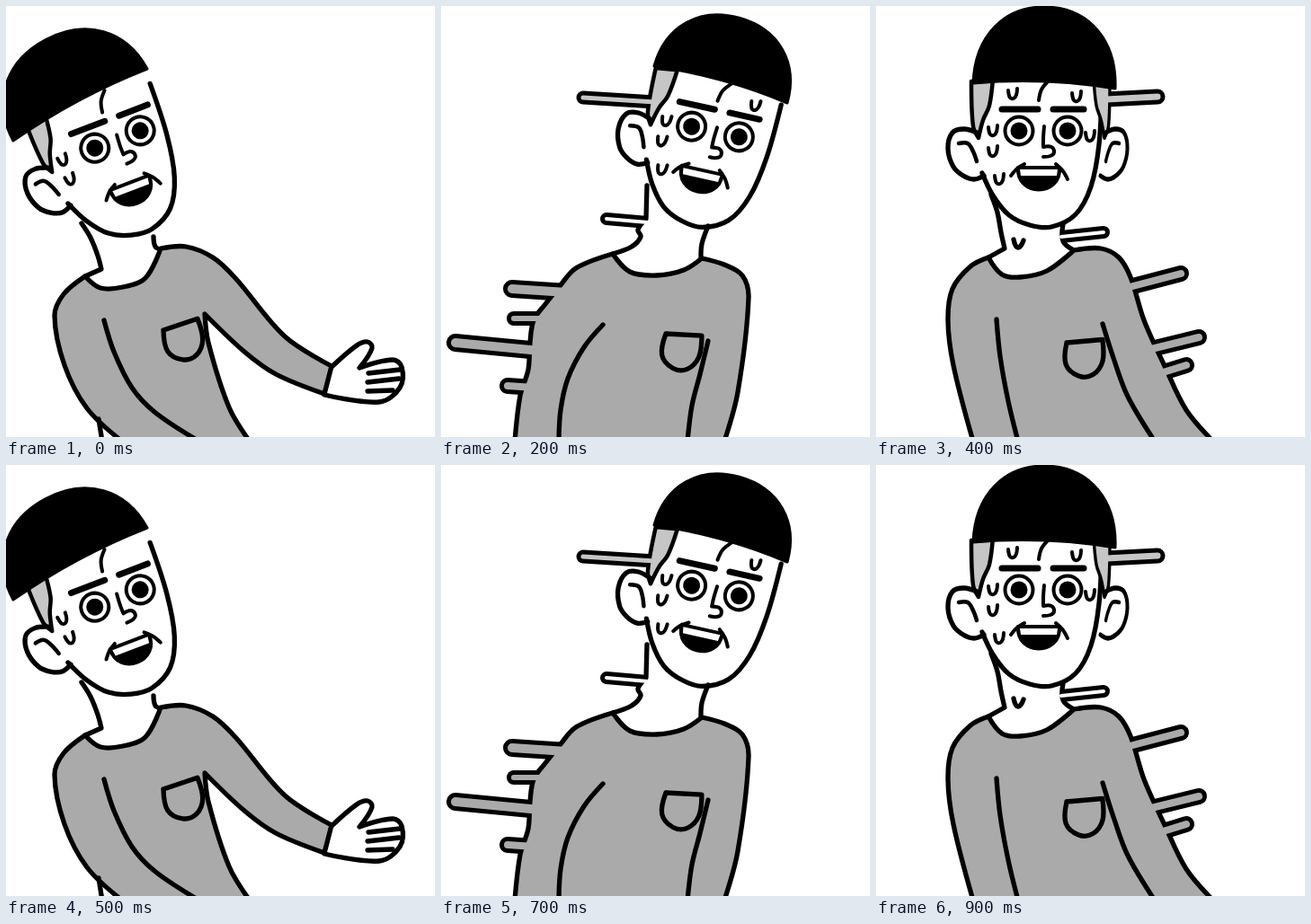
An HTML page with a canvas that plays this animation: 477 by 480 pixels, repeating every 1000 ms.

```html
<!DOCTYPE html>
<html>
<head>
<meta charset="utf-8">
<style>
html, body { margin: 0; height: 100%; overflow: hidden; background: #fff; }
canvas { display: block; }
</style>
</head>
<body>
<canvas id="stage" width="477" height="480"></canvas>
<script>
const ctx = document.getElementById('stage').getContext('2d');
const BLACK = '#000', WHITE = '#fff', SHIRT = '#aaa', LIGHT = '#c6c6c6', STEP = 100;

// head: point between the eyes, tilt in degrees; turn: sideways shift of the skull
// hair: ends of the fringe and height; smears: from, to, thickness, colour
// Strings are smooth curves through "x,y" points; "/" marks a sharp corner.
const left = {
  head: [124, 148.5, -21], turn: -9, mouth: 50, drops: 2,
  hair: [8, 150, 157, 70, 82], pocket: [175, 361], smears: [],
  neck: ['84,242 94,258 102,278 106,293 / 88,301', '172,271 166,268 164,257'],
  shirt: '128,484 90,448 65,400 54,345 64,321 88,301 / 105,314 130,313 155,303 172,270 / 200,268 230,280 255,303 310,368 362,401 / 354,432 / 300,410 265,385 221,343 / 225,375 248,447 271,485',
  lines: ['103,460 107,485', '109,350 120,385 140,425 165,452 210,482',
    '362,402 390,378 402,374 407,381 393,403 / 430,394 440,402 438,425 415,441 354,433',
    '403,409 438,405', '402,419 437,415', '402,429 430,428']
};

const swingRight = {
  head: [305, 140, 12.5], turn: 0, mouth: 45, drops: 4,
  hair: [237, 67, 385, 108, 77], pocket: [250, 365],
  smears: [[238, 107, 158, 102, 10, LIGHT], [230, 241, 184, 237, 9, WHITE],
    [140, 319, 79, 315, 15, SHIRT], [110, 348, 81, 348, 11, SHIRT],
    [110, 384, 16, 375, 15, SHIRT], [104, 425, 74, 423, 13, SHIRT]],
  neck: ['229,200 228,237 / 219,249 222,257 212,268 191,276', '289,281 290,265 297,245'],
  shirt: '82,485 88,434 97,405 99,375 103,350 116,332 132,312 150,292 191,276 / 210,296 240,300 270,294 290,281 / 315,288 335,300 342,325 330,430 315,485',
  lines: ['180,355 159,380 141,415 133,450 131,485', '297,373 288,410 279,445 274,485']
};

const right = {
  head: [381, 158, 19.4], turn: 0, mouth: 41, drops: 6,
  hair: [321, 88, 464, 139, 81], pocket: [300, 394], smears: [],
  neck: ['303,226 298,255 289,282 / 259,283', '342,298 347,283 354,265'],
  shirt: '50,485 105,450 165,360 195,320 230,290 259,282 / 280,309 310,314 344,300 / 370,305 388,324 394,360 365,440 337,485',
  lines: ['222,379 190,415 165,450 134,484', '344,391 325,430 308,455 274,484']
};

const swingLeft = {
  head: [186, 139, 0], turn: 0, mouth: 41, drops: 6, bothSides: true,
  hair: [108, 86, 266, 92, 88], pocket: [212, 375],
  smears: [[256, 104, 313, 101, 12, LIGHT], [206, 257, 253, 252, 9, WHITE],
    [278, 314, 339, 298, 13, SHIRT], [302, 383, 359, 369, 13, SHIRT],
    [316, 409, 345, 400, 13, SHIRT]],
  neck: ['128,210 135,230 139,252 143,270 / 125,280', '220,272 208,262 208,243'],
  shirt: '108,485 86,400 80,350 85,315 105,290 125,280 / 140,299 160,302 190,295 220,272 / 250,270 270,280 283,302 298,350 321,401 345,450 375,485',
  lines: ['134,349 138,390 147,440 158,485', '252,354 265,395 280,435 310,485', '153,260 158,269 164,261']
};

const middle = { ...swingLeft, smears: [] };
const poses = [left, middle, swingRight, right, swingLeft];

const drops = [[-56, 0], [-56, 23], [-49, 54], [37, -38], [-34, -41], [52, 6]];

// Tangent handles follow each segment's length, so tight turns stay round.
function curve(text, fill, width = 5.3) {
  const parts = text.split('/').map(s => s.trim().split(/\s+/).map(p => p.split(',').map(Number)));
  ctx.beginPath();
  ctx.moveTo(...parts[0][0]);
  let last;
  for (const part of parts) {
    const pts = last ? [last, ...part] : part;
    const dir = pts.map((p, i) => {
      const a = pts[i - 1], b = pts[i + 1];
      if (!a || !b) return [0, 0];
      const dx = b[0] - a[0], dy = b[1] - a[1], n = Math.hypot(dx, dy) || 1;
      return [dx / n, dy / n];
    });
    for (let i = 1; i < pts.length; i++) {
      const [ax, ay] = pts[i - 1], [bx, by] = pts[i];
      const h = Math.hypot(bx - ax, by - ay) / 3;
      ctx.bezierCurveTo(ax + dir[i - 1][0] * h, ay + dir[i - 1][1] * h,
        bx - dir[i][0] * h, by - dir[i][1] * h, bx, by);
    }
    last = pts[pts.length - 1];
  }
  paint(fill, width);
}

function paint(fill, width) {
  if (fill) { ctx.fillStyle = fill; ctx.fill(); }
  if (width) { ctx.lineWidth = width; ctx.stroke(); }
}

function line(x1, y1, x2, y2, width, color = BLACK) {
  ctx.strokeStyle = color;
  ctx.beginPath();
  ctx.moveTo(x1, y1);
  ctx.lineTo(x2, y2);
  paint(null, width);
  ctx.strokeStyle = BLACK;
}

// Runs a drawing in a moved and turned frame.
function at(x, y, degrees, drawing) {
  ctx.save();
  ctx.translate(x, y);
  ctx.rotate(degrees * Math.PI / 180);
  drawing();
  ctx.restore();
}

function hair(x1, y1, x2, y2, h) {
  const r = Math.hypot(x2 - x1, y2 - y1) / 2;
  const tilt = Math.atan2(y2 - y1, x2 - x1) * 180 / Math.PI;
  at((x1 + x2) / 2, (y1 + y2) / 2, tilt, () => {
    ctx.beginPath();
    ctx.moveTo(-r, 0);
    ctx.bezierCurveTo(-r, -h * .6, -r * .6, -h, 0, -h);
    ctx.bezierCurveTo(r * .6, -h, r, -h * .6, r, 0);
    ctx.quadraticCurveTo(0, -10, -r, 0);
    paint(BLACK, 3);
  });
}

function eye(x) {
  for (const [r, fill, width] of [[15.5, WHITE, 4], [9.5, BLACK, 0]]) {
    ctx.beginPath();
    ctx.arc(x, 0, r, 0, 7);
    paint(fill, width);
  }
}

function mouth() {
  const w = 23, h = 25;
  ctx.beginPath();
  ctx.moveTo(-w, 0);
  ctx.lineTo(w, 0);
  ctx.bezierCurveTo(w + 2, h * 1.3, -w - 2, h * 1.3, -w, 0);
  paint(BLACK, 4);
  ctx.beginPath();
  ctx.moveTo(2 - w, 2);
  ctx.lineTo(w - 2, 2);
  ctx.lineTo(w - 3, 9);
  ctx.lineTo(3 - w, 9);
  paint(WHITE);
  curve('-31,9 -24,1 -16,-4', null, 4);
  curve('19,-4 27,4 32,13', null, 4);
}

function side() {
  curve('-80,-55 -56,-58 / -60,-28 -67,-12 -72,8 / -78,-5 -80,-55', LIGHT, 4.5);
  curve('-74,2 -88,-2 -101,2 -106,20 -100,40 -89,50 -77,54 -66,50');
  curve('-94,14 -84,14 -78,23 -74,34', null, 4.5);
}

function skull(p) {
  curve('-68,47 -56,72 -38,94 -15,105 9,107 36,93 53,62 62,15 65,-45');
  side();
  if (p.bothSides) at(14, 0, 0, () => { ctx.scale(-.75, 1); side(); });
  for (const [x, y] of drops.slice(0, p.drops))
    at(x, y, 0, () => curve('-5,-4 -3,4 1,5 4,1 5,-6', null, 4));
}

function face(p) {
  eye(-27);
  eye(27);
  line(-46, -24, -6, -24, 7);
  line(11, -24, 45, -24, 7);
  curve('1,-5 0,8 0,18 / 9,18 12,24 8,28 0,29', null, 4);
  curve('6,-56 -2,-46 -5,-34', null, 4);
  at(-5, p.mouth, 0, mouth);
}

function pocket() {
  curve('0,0 40,0 / 38,24 26,38 10,38 -3,24 0,0');
}

function draw(p) {
  const tilt = p.head[2];
  ctx.fillStyle = WHITE;
  ctx.fillRect(0, 0, 477, 480);
  for (const [x1, y1, x2, y2, size] of p.smears) line(x1, y1, x2, y2, size + 5);
  curve(p.neck.join(' / '), WHITE, 0);
  p.neck.forEach(s => curve(s));
  curve(p.shirt, SHIRT);
  p.lines.forEach(s => curve(s));
  at(...p.pocket, tilt * .65 - 5, pocket);
  at(...p.head, () => at(p.turn, 0, 0, () => skull(p)));
  for (const [x1, y1, x2, y2, size, color] of p.smears) line(x1, y1, x2, y2, size - 5, color);
  hair(...p.hair);
  at(...p.head, () => face(p));
}

function tick() {
  draw(poses[Math.floor(performance.now() / STEP) % poses.length]);
  requestAnimationFrame(tick);
}

ctx.lineCap = ctx.lineJoin = 'round';
tick();
</script>
</body>
</html>
```
